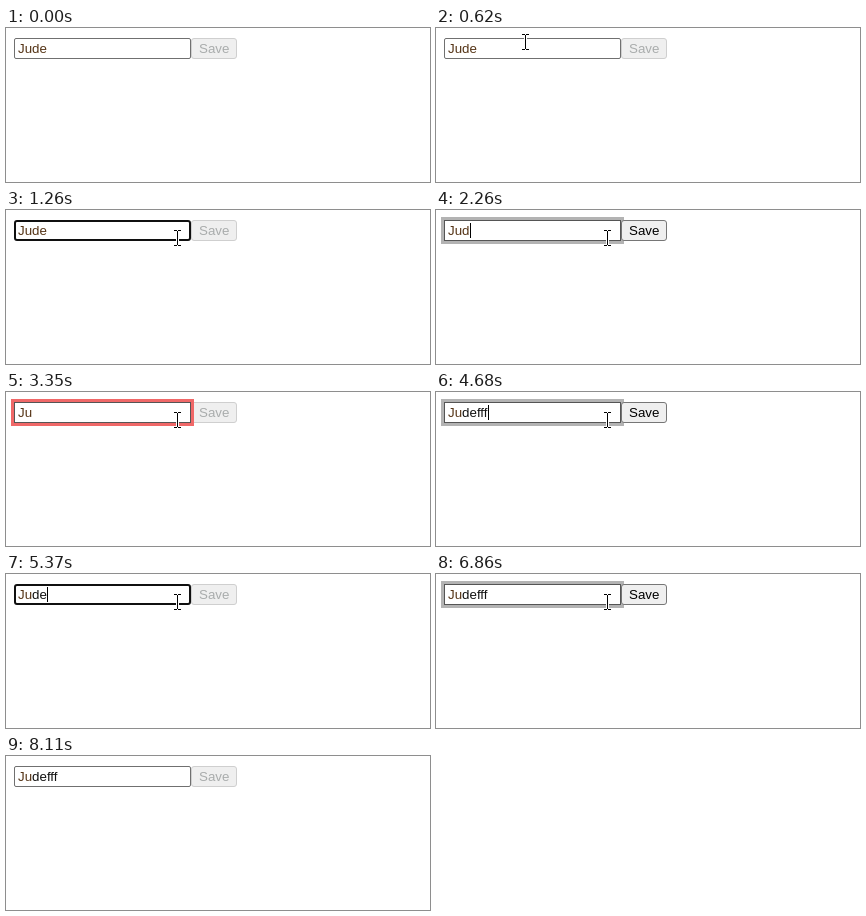
Recreate the animation shown at these times as an HTML page. Size 424 by 154 pixels, loop 8.19 s.

```html
<!DOCTYPE html>
<html lang="en">
<head>
<meta charset="utf-8">
<title>Form field</title>
<style>
  html, body { margin: 0; width: 100%; height: 100%; overflow: hidden; background: #fff; }
  body { position: relative; font: 13.333px/15px "Liberation Sans", Arial, sans-serif; }
  .field, .save, .pointer { position: absolute; box-sizing: border-box; }
  .field {
    left: 8px; top: 10px; width: 177px; height: 21px; padding: 2px 3px;
    border: 1px solid #707070; border-radius: 2px; background: #fff;
    white-space: pre; z-index: 1; color: #111;
  }
  .field.focus { padding: 1px 2px; border: 2px solid #101010; border-radius: 3px; }
  .field.dirty {
    padding: 2px 3px; border: 1px solid #555; border-radius: 0;
    box-shadow: 0 0 0 3px #b3b3b3;
  }
  .field.invalid { box-shadow: 0 0 0 3px #f06868; }
  .kept { color: #553416; }
  .caret { position: absolute; width: 1px; height: 15px; background: #000; }
  .save {
    left: 185px; top: 10px; width: 46.4px; height: 21px; padding: 2px 7px;
    border: 1px solid #cfcfcf; border-radius: 3px; background: #efefef; color: #a9acac;
  }
  .save.on { border-color: #767676; color: #000; z-index: 2; }
  .pointer { left: 0; top: 0; z-index: 3; overflow: visible; }
</style>
</head>
<body>
<div class="field"><span class="kept"></span><span class="typed"></span><span class="caret"></span></div>
<div class="save">Save</div>
<svg class="pointer" width="12" height="19">
  <path id="arrow" d="M.5 .5V16.5L4.2 13L6.7 18.5L9 17.5L6.6 12H11.5Z" fill="#fff" stroke="#000"/>
  <g id="beam" transform="translate(-3 -8)" fill="none" shape-rendering="crispEdges">
    <path d="M3.5 1V15" stroke="#fff" stroke-width="3"/>
    <path d="M0 .5H3M4 .5H7M3.5 1V15M0 15.5H3M4 15.5H7" stroke="#000"/>
  </g>
</svg>
<script>
  const LOOP = 8190, FOCUS = 700, SAVE = 7010, BLUR = 8110;
  const BLINK = 530, TICK = 80;
  const NAME = "Jude", MIN_LENGTH = 3;

  const bursts = [
    { start: 1800, keys: 2, gap: 540, step: -1 },
    { start: 3430, keys: 2, gap: 240, step: 1 },
    { start: 4370, keys: 4, gap: 153, step: 1 },
    { start: 4990, keys: 4, gap: 126, step: -1 },
    { start: 6070, keys: 3, gap: 120, step: 1 }
  ];
  const strokes = [
    { start: 140, time: 480, from: [217, 101], bend: [110, -9], to: [89, 14] },
    { start: 860, time: 160, from: [89, 14], bend: [130, 21], to: [171, 28] },
    { start: 7470, time: 240, from: [171, 28], bend: [345, 109], to: [519, 190] }
  ];

  const $ = s => document.querySelector(s);
  const field = $(".field"), kept = $(".kept"), typed = $(".typed"), caret = $(".caret");
  const save = $(".save"), pointer = $(".pointer"), arrow = $("#arrow"), beam = $("#beam");
  const show = (el, on) => { el.style.visibility = on ? "visible" : "hidden"; };

  // Replays the keys pressed up to time t
  function typeUntil(t) {
    let length = NAME.length, least = length, last = FOCUS;
    for (const { start, keys, gap, step } of bursts) {
      for (let i = 0; i < keys && start + i * gap <= t; i++) {
        length += step;
        least = Math.min(least, length);
        last = start + i * gap;
      }
    }
    return { length, least, last };
  }

  function drawForm(t) {
    const { length, least, last } = typeUntil(t);
    const text = NAME.padEnd(length, "f").slice(0, length);
    const focused = t >= FOCUS && t < BLUR;
    const dirty = t < SAVE && text !== NAME;
    const invalid = length < MIN_LENGTH;

    kept.textContent = text.slice(0, least);
    typed.textContent = text.slice(least);
    field.classList.toggle("focus", focused);
    field.classList.toggle("dirty", dirty);
    field.classList.toggle("invalid", invalid);
    save.classList.toggle("on", dirty && !invalid);
    show(caret, focused && Math.floor((t - last) / BLINK) % 2 === 0);
  }

  function drawPointer(t) {
    const stroke = strokes.filter(s => s.start <= t).pop();
    show(arrow, false);
    show(beam, false);
    if (!stroke) return;
    const { start, time, from, bend, to } = stroke;
    const s = Math.min(1, Math.floor((t - start) / TICK) * TICK / time);
    const [x, y] = from.map((a, i) =>
      Math.round(a * (1 - s) ** 2 + 2 * bend[i] * s * (1 - s) + to[i] * s * s));
    const inside = x >= 8 && x < 185 && y >= 10 && y < 31;
    show(inside ? beam : arrow, true);
    pointer.style.transform = `translate(${x}px, ${y}px)`;
  }

  const origin = performance.now();
  function frame() {
    const t = (performance.now() - origin) % LOOP;
    drawForm(t);
    drawPointer(t);
    requestAnimationFrame(frame);
  }
  frame();
</script>
</body>
</html>
```
